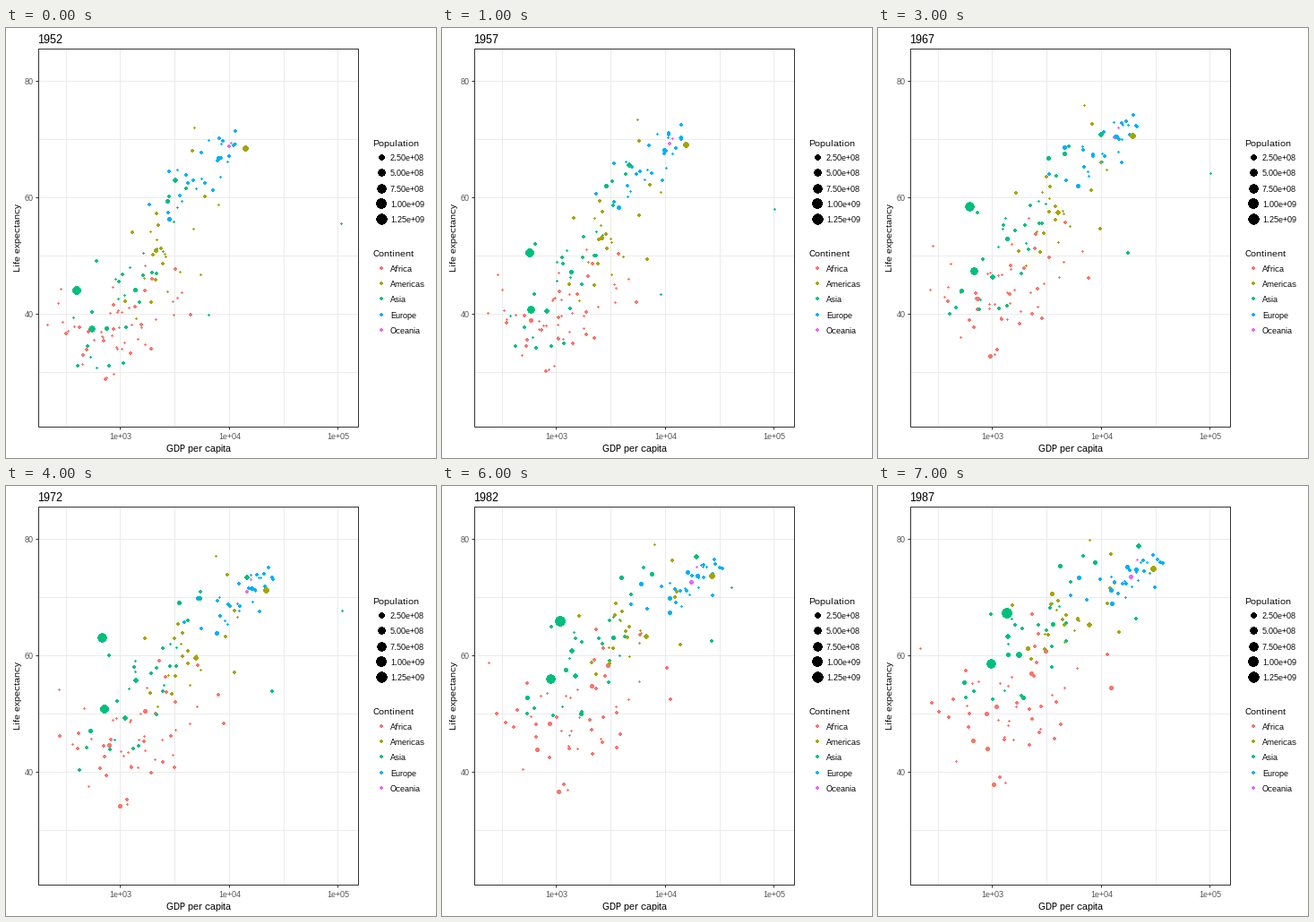
A matplotlib script for the animation above (8000 ms loop, 480 by 480 pixels).

```python
import numpy as np
import matplotlib.pyplot as plt
from matplotlib.animation import FuncAnimation

plt.rcParams.update({
    "font.family": "Liberation Sans",
    "text.hinting": "native",
    "text.hinting_factor": 1,
})

SIZE, DPI = 480, 96
PT = 72 / DPI
STEPS = 8
T = np.linspace(0, 1, STEPS)
ARC = T * (1 - T)
LEFT, RIGHT, TOP, BOTTOM = 36.5, 393.5, 23.5, 445.5

COLORS = {
    "Africa": "#F8766D",
    "Americas": "#A3A500",
    "Asia": "#00BF7D",
    "Europe": "#00B0F6",
    "Oceania": "#E76BF3",
}

# Per continent: number of countries, (log income, spread, life, spread) at the
# start and at the end, income-life correlation, bend of the path in income
# and life, typical population in millions, growth factor
CLOUDS = {
    "Oceania": (2, (4.01, 0.01, 69.2, 0.2), (4.31, 0.03, 75.3, 1),
                0.9, (0.03, -2), 6, 1.7),
    "Africa": (52, (3.0, 0.3, 38.9, 4.8), (3.19, 0.37, 53, 7.2),
               0.4, (0.2, 0.5), 3.5, 2.5),
    "Asia": (27, (3.17, 0.33, 46.8, 8.5), (3.54, 0.46, 65.3, 6.8),
             0.65, (0, 2.5), 8, 2.2),
    "Americas": (23, (3.48, 0.2, 53, 8), (3.71, 0.23, 68, 5),
                 0.65, (0.3, 2), 4, 2),
    "Europe": (30, (3.69, 0.24, 64.8, 4.4), (4.18, 0.24, 73.6, 2.4),
               0.8, (0.25, 1.2), 8, 1.2),
}

# Dots that stand apart: continent, population at both ends in millions,
# then key points (step, income, life expectancy)
LANDMARKS = [
    ("Asia", 0.2, 1.9, [(0, 108382, 55.6), (2, 95458, 60.5),
                        (4, 109348, 67.7), (5, 59265, 69.3),
                        (7, 28118, 74.2)]),
    ("Asia", 4, 14.6, [(0, 6460, 39.9), (4, 24838, 53.9),
                       (5, 34168, 58.7), (7, 21198, 66.3)]),
    ("Asia", 4.7, 8.4, [(0, 368, 39.4), (4, 422, 40.3), (5, 525, 31.2),
                        (6, 624, 51), (7, 684, 53.9)]),
    ("Asia", 82, 169, [(0, 750, 37.5), (4, 1111, 49.2), (7, 1748, 60.1)]),
    ("Asia", 86, 122, [(0, 3217, 63), (4, 14779, 73.4), (7, 22376, 78.7)]),
    ("Americas", 57, 143, [(0, 2109, 50.9), (4, 4986, 59.5),
                           (7, 7807, 65.2)]),
    ("Americas", 158, 243, [(0, 13990, 68.4), (4, 21806, 71.3),
                            (7, 29884, 75)]),
    ("Asia", 372, 788, [(0, 547, 37.4), (4, 724, 50.7), (7, 977, 58.6)]),
    ("Asia", 556, 1084, [(0, 400, 44), (1, 576, 50.5), (2, 488, 44.5),
                         (3, 613, 58.4), (4, 677, 63.1), (7, 1379, 67.3)]),
]


def x_px(log_gdp):
    return 127.9 + 121.4 * (log_gdp - 3)


def y_px(life):
    return 59.5 + 6.5 * (80 - life)


def center(v):
    return np.floor(v) + 0.5


def pop_width(millions):
    size = 1 + 5 * np.sqrt(np.asarray(millions) / 1319)
    return np.round(2.13 * size + 0.7)


def cloud(rng, count, start, end, corr, bend, pop, growth):
    """Seeded paths of (log income, life) and populations over all steps."""
    z, drift, extra, rank = rng.triangular(-2.4, 0, 2.4, (4, count, 1))
    life_z = corr * z + np.sqrt(1 - corr ** 2) * extra
    end_z = 0.9 * z + 0.44 * drift
    gdp = ((1 - T) * (start[0] + start[1] * z)
           + T * (end[0] + end[1] * end_z) + ARC * bend[0])
    life = ((1 - T) * (start[2] + start[3] * life_z)
            + T * (end[2] + end[3] * life_z) + ARC * bend[1])
    return gdp, life, pop * np.exp(1.1 * rank) * growth ** (T - 0.43)


def landmark(first, last, keys):
    step, gdp, life = np.array(keys).T
    steps = np.arange(STEPS)
    return (np.interp(steps, step, np.log10(gdp)),
            np.interp(steps, step, life),
            first * (last / first) ** T)


def build():
    rng = np.random.RandomState(12)
    parts, colors = [], []
    for name, spec in CLOUDS.items():
        parts.append(cloud(rng, *spec))
        colors += [COLORS[name]] * spec[0]
    for name, *spec in LANDMARKS:
        parts.append(landmark(*spec))
        colors.append(COLORS[name])
    gdp, life, pops = (np.vstack(p) for p in zip(*parts))
    return x_px(gdp), y_px(life), pop_width(pops), colors


fig = plt.figure(figsize=(SIZE / DPI, SIZE / DPI), dpi=DPI, facecolor="white")
ax = fig.add_axes([0, 0, 1, 1])
ax.set_xlim(0, SIZE)
ax.set_ylim(SIZE, 0)
ax.axis("off")


def line(xs, ys, color, z):
    ax.plot(xs, ys, color=color, lw=PT, zorder=z, snap=False,
            solid_capstyle="butt", solid_joinstyle="miter")


def label(x, y, text, size, color="black", **kw):
    return ax.text(x, y, text, fontsize=size * PT, color=color,
                   va="baseline", **kw)


def place(dots, x, y, width):
    """Put dots of whole pixel widths on the pixel grid."""
    odd = 0.5 * (width % 2)
    dots.set_offsets(np.column_stack([np.floor(x) + odd, np.floor(y) + odd]))
    # Hard-edged fills cover every pixel they touch, so shrink them a little
    dots.set_sizes(((width - 1.6) * PT) ** 2)


def add_dots(x, y, width, colors, z):
    dots = ax.scatter(x, y, c=colors, linewidths=0, zorder=z,
                      antialiased=False, snap=False)
    place(dots, x, y, width)
    return dots


def draw_panel():
    grid, edge, grey = "#EBEBEB", "#333333", "#4D4D4D"
    for log_gdp in np.arange(2.5, 5.1, 0.5):
        x = center(x_px(log_gdp))
        line([x, x], [TOP, BOTTOM], grid, 1)
        if log_gdp % 1 == 0:
            line([x, x], [BOTTOM, BOTTOM + 3], edge, 5)
            label(x, 459, f"1e+{int(log_gdp):02d}", 9, grey, ha="center")
    for life in range(30, 81, 10):
        y = center(y_px(life))
        line([LEFT, RIGHT], [y, y], grid, 1)
        if life in (40, 60, 80):
            line([LEFT - 3, LEFT], [y, y], edge, 5)
            label(31, y + 3.5, str(life), 9, grey, ha="right")
    line([LEFT, RIGHT, RIGHT, LEFT, LEFT, RIGHT],
         [TOP, TOP, BOTTOM, BOTTOM, TOP, TOP], edge, 5)
    label(215, 473, "GDP per capita", 10.5, ha="center")
    label(16, 272.5, "Life expectancy", 10.2, rotation=90,
          rotation_mode="anchor", ha="left")


def draw_legends():
    rows = 17.28 * np.arange(5)
    x = np.full(5, 419.0)

    label(409, 132, "Population", 10.4)
    millions = 250 * np.arange(1, 6)
    add_dots(x, 144.5 + rows, pop_width(millions), ["black"] * 5, 5)
    for y, pop in zip(144.5 + rows, millions):
        label(429, center(y) + 3.5, f"{pop * 1e6:.2e}", 9)

    label(409, 255, "Continent", 10.1)
    add_dots(x, 268.2 + rows, np.full(5, 4), list(COLORS.values()), 5)
    for y, name in zip(268.2 + rows, COLORS):
        label(429, center(y) + 3.5, name, 8.9)


draw_panel()
draw_legends()
title = label(35, 17, "1952", 12.8)
xs, ys, widths, colors = build()
countries = add_dots(xs[:, 0], ys[:, 0], widths[:, 0], colors, 3)


def update(i):
    title.set_text(str(1952 + 5 * i))
    place(countries, xs[:, i], ys[:, i], widths[:, i])
    return countries, title


anim = FuncAnimation(fig, update, frames=STEPS, interval=1000, repeat=True)
plt.show()
```
